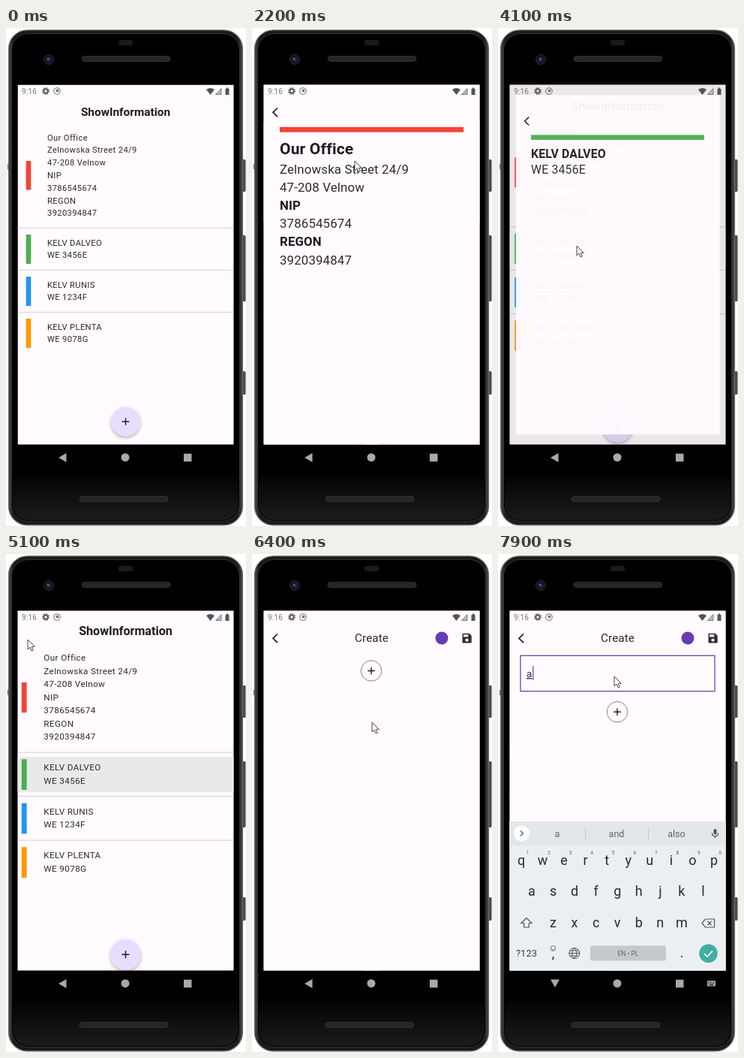
An HTML page for the animation above (8000 ms loop, 320 px wide and 663 px high).

```html
<!DOCTYPE html>
<html lang="en">
<head>
<meta charset="utf-8">
<title>Phone demo</title>
<style>
html, body { margin: 0; width: 100%; height: 100%; overflow: hidden; background: #fff; }
svg { display: block; width: 320px; height: 663px; font-family: Roboto, sans-serif; }
text { fill: #2b2a2e; white-space: pre; }
.mid { text-anchor: middle; }
.list { font-size: 11.2px; letter-spacing: .35px; }
.body { font-size: 16.8px; letter-spacing: .17px; }
.head { font-size: 21px; letter-spacing: .17px; }
.bar { font-size: 15.4px; }
.bold { font-weight: 700; fill: #1d1b20; }
.key { font-size: 18px; }
.hint { font-size: 12.5px; fill: #5f6368; }
.tiny { font-size: 6.5px; fill: #5f6368; }
.line { fill: none; stroke: #1d1b20; stroke-width: 1.4; }
.soft { fill: none; stroke: #50555a; stroke-width: 1.2; }
</style>
</head>
<body>
<svg id="stage" viewBox="0 0 320 663"></svg>
<script>
const PAPER = '#fffbff';
const text = (x, y, s, cls = '') => `<text x="${x}" y="${y}" class="${cls}">${s}</text>`;
const rect = (x, y, w, h, fill, more = '') =>
  `<rect x="${x}" y="${y}" width="${w}" height="${h}" fill="${fill}" ${more}/>`;
const circle = (x, y, r, fill, more = '') => `<circle cx="${x}" cy="${y}" r="${r}" fill="${fill}" ${more}/>`;
const path = (d, more) => `<path d="${d}" ${more}/>`;
const group = (id, body, more = '') => `<g id="${id}" ${more}>${body}</g>`;
const plus = (x, y, r) => path(`M${x - r} ${y}h${2 * r}M${x} ${y - r}v${2 * r}`, 'class="line"');
const sheet = rect(15.5, 75.5, 288.5, 479.5, PAPER);
const back = path('M34 106.5l-6 5.8 6 5.8', 'class="line" style="stroke-width:1.7"');
const banner = color => rect(37, 131.8, 245, 6.9, color);

const company = ['Our Office', 'Zelnowska Street 24/9', '47-208 Velnow', 'NIP', '3786545674', 'REGON', '3920394847'];
const cars = [
  ['KELV DALVEO', 'WE 3456E', '#4caf50'],
  ['KELV RUNIS', 'WE 1234F', '#2196f3'],
  ['KELV PLENTA', 'WE 9078G', '#ff9800'],
];

function phone() {
  return `<defs>
    <linearGradient id="side"><stop offset="0" stop-color="#4a4a4a"/><stop offset=".02" stop-color="#1a1a1a"/>
      <stop offset=".98" stop-color="#1a1a1a"/><stop offset="1" stop-color="#4a4a4a"/></linearGradient>
    <linearGradient id="chin" x2="0" y2="1"><stop offset="0" stop-color="#000"/><stop offset="1" stop-color="#1c1c1c"/></linearGradient>
    <clipPath id="screen">${rect(15.5, 75.5, 288, 479, '#000')}</clipPath>
    <filter id="shade" x="-40%" y="-40%" width="180%" height="180%">
      <feDropShadow dx="0" dy="2" stdDeviation="2" flood-opacity=".32"/></filter></defs>`
    + [[175, 43], [276, 88], [457, 31]].map(([y, h]) => rect(314, y, 5.5, h, '#4a4a4a', 'rx="1.5"')).join('')
    + rect(2, 181, 4, 7, '#666')
    + rect(3.5, 2.8, 312, 659, 'url(#side)', 'rx="25" stroke="#6a6a6a" stroke-width="1.2"')
    + rect(7.5, 7.5, 304, 649, '#000', 'rx="22" stroke="#3c3c3c" stroke-width=".8"')
    + rect(9, 588, 301, 67, 'url(#chin)', 'rx="21"')
    + rect(101, 37.5, 118, 7, '#262626', 'rx="3.5" stroke="#3a3a3a" stroke-width=".7"')
    + rect(98, 623.5, 118, 7, '#262626', 'rx="3.5" stroke="#3a3a3a" stroke-width=".7"')
    + rect(150, 16, 19, 7, '#1b1b1b', 'rx="2"')
    + circle(57, 42, 6.5, '#15151c', 'stroke="#292931"') + circle(57, 42, 2.7, '#252b62')
    + circle(56, 41, 1, '#7880b6');
}

function statusBar() {
  return '<text x="21" y="88" font-size="10" style="fill:#77757a" letter-spacing=".2">9:16</text>'
    + circle(53, 84, 2.7, 'none', 'stroke="#5d5b60" stroke-width="2"')
    + circle(53, 84, 4.3, 'none', 'stroke="#5d5b60" stroke-width="1.4" stroke-dasharray="1.7 1.68"')
    + circle(68, 84, 4.3, 'none', 'stroke="#77757a" stroke-width="1.1"') + circle(68.5, 83.5, 2, '#77757a')
    + path('M267 82q5.500-4 11 0l-5.500 7z', 'fill="#55535a"')
    + path('M279.500 88.500h7.500v-8z', 'fill="#bbb8bd" stroke="#66646a" stroke-width=".8"')
    + path('M292.500 81h1.300v-1.500h2.400v1.500h1.300v8h-5z', 'fill="#55535a"');
}

function listPage() {
  let s = sheet + text(159.5, 117, 'ShowInformation', 'bar bold mid');
  s += rect(0, 135.5, 320, 126, '#e9e9e9', 'id="tap0"') + rect(0, 272, 320, 45, '#e9e9e9', 'id="tap1"');
  s += rect(26.7, 177, 6.6, 38.5, '#f44336');
  company.forEach((line, i) => s += text(55, 149.5 + 16.8 * i, line, 'list'));
  cars.forEach(([name, plate, color], i) => {
    const y = 266.3 + 56 * i;
    s += rect(0, y - .4, 320, .8, '#cac4d0') + rect(26.7, y + 8.7, 6.6, 39, color)
      + text(55, y + 23.2, name, 'list') + text(55, y + 40, plate, 'list');
  });
  return s + circle(159.5, 524, 19.6, '#e8ddfd', 'filter="url(#shade)"') + plus(159.5, 524, 4.8);
}

function companyPage() {
  let s = sheet + back + banner('#f44336') + text(37, 168, company[0], 'head bold');
  company.slice(1).forEach((line, i) =>
    s += text(37, 194 + 24.1 * i, line, /^[A-Z]+$/.test(line) ? 'body bold' : 'body'));
  return s;
}

function carPage() {
  const [name, plate, color] = cars[0];
  return sheet + back + banner(color) + text(37, 164, name, 'body bold') + text(37, 187, plate, 'body');
}

function createPage() {
  return sheet + back + text(159.5, 117.3, 'Create', 'bar mid') + circle(253, 112, 8.5, '#673ab7')
    + path('M281.500 105.800h8.200l3 3v8.600q0 1-1 1h-10.200q-1 0-1-1v-10.600q0-1 1-1z', 'fill="#302e34"')
    + rect(282, 107.3, 6.3, 3, PAPER) + circle(286.5, 114.6, 2.1, PAPER)
    + group('field', rect(30, 135.3, 259, 47.4, 'none', 'id="frame" stroke-width="1.3"')
      + group('typed', '<text x="38" y="164" font-size="13.500" text-decoration="underline">a</text>')
      + rect(46.3, 149, 1.2, 19, '#673ab7', 'id="caret"'))
    + group('add', circle(159, 155.5, 13.7, 'none', 'stroke="#77747b" stroke-width=".9"') + plus(159, 155.5, 4.7));
}

function keyboard() {
  const step = 28.55;
  const row = (keys, x, y) => [...keys].map((k, i) => text(x + step * i, y, k, 'key mid')).join('');
  const digits = [...'1234567890'].map((k, i) => text(39.5 + step * i, 400, k, 'tiny mid')).join('');
  return rect(15, 356, 290, 200, '#eceff1') + rect(15, 356, 290, 32, '#e4e7e9')
    + circle(31.5, 372, 10.5, '#fff') + path('M30 368.500l3.500 3.500-3.500 3.500', 'class="soft"')
    + group('hints', text(79, 376.5, 'a', 'hint mid') + text(158, 376.5, 'and', 'hint mid')
      + text(238, 376.5, 'also', 'hint mid') + rect(116, 364, .8, 17, '#bfc3c6') + rect(200, 364, .8, 17, '#bfc3c6'))
    + rect(287.5, 366, 4, 7.5, '#50555a', 'rx="2"') + path('M285.500 371.500q0 4.300 4 4.300t4-4.300M289.500 376v2.500', 'class="soft"')
    + row('qwertyuiop', 31, 414) + digits + row('asdfghjkl', 45, 455) + row('zxcvbnm', 73.5, 497)
    + path('M38 484.500l-7 7h3.700v5.500h6.600v-5.500h3.700z', 'class="soft"')
    + path('M272 491.500l4.500-5.500h12v11h-12zM279.500 489l5 5m0-5l-5 5', 'class="soft"')
    + '<text x="38" y="536" class="mid" font-size="13" style="fill:#3c4043">?123</text>'
    + text(73.5, 538, ',', 'key mid') + circle(73.5, 525, 3.3, 'none', 'stroke="#50555a" stroke-width=".8"')
    + path('M71.800 526q1.700 2 3.400 0', 'class="soft" style="stroke-width:.7"')
    + path('M94.800 531.500a7 7 0 1 0 14 0a7 7 0 1 0-14 0zh14M101.800 524.500q-6.500 7 0 14q6.500-7 0-14M96 528h11.600M96 535h11.600'.replace('zh14', 'h14'),
      'class="soft" style="stroke-width:1"')
    + rect(123, 521.5, 101, 20, '#c5c9cb', 'rx="2"')
    + '<text x="173.500" y="534.500" class="mid" font-size="8.500" style="fill:#5f6368">EN • PL</text>'
    + text(245, 537, '.', 'key mid')
    + circle(280.5, 531.8, 12.3, '#43ada2') + path('M275 532l4 4 7-7.500', 'fill="none" stroke="#fff" stroke-width="1.6"');
}

function navBar() {
  const gray = 'fill="#a9a9a9"';
  let dots = '';
  for (let i = 0; i < 8; i++) dots += rect(280.3 + i % 4 * 2.2, 569.5 + (i >> 2) * 2, 1.1, 1.1, '#000');
  return path('M70 572l10.500-6v12z', `id="navBack" ${gray}`) + path('M70 566.500h12l-6 10.500z', `id="navDown" ${gray}`)
    + circle(159, 571.7, 5.5, '#a9a9a9') + rect(237, 566.7, 10.5, 10.5, '#a9a9a9')
    + group('navKeys', rect(279, 568, 11, 7.5, '#a9a9a9', 'rx="1"') + dots + rect(282, 573.4, 5, 1, '#000'));
}

stage.innerHTML = phone()
  + group('app', group('list', listPage()) + rect(15, 75, 290, 481, '#000', 'id="scrim"')
    + group('company', companyPage()) + group('car', carPage()) + group('create', createPage())
    + circle(35, 112, 14, '#000', 'id="ripple" opacity=".13"') + statusBar() + group('keys', keyboard()),
  'clip-path="url(#screen)"')
  + navBar()
  + group('mouse', path('M0 0v12.800l3-2.700 2.200 4.900 2.200-1-2.200-4.700h4.100z', 'fill="#fffbff" stroke="#333" stroke-width=".9"'));

const el = id => document.getElementById(id);
const set = (id, name, value) => el(id).setAttribute(name, value);
const show = (id, on) => set(id, 'visibility', on ? 'inherit' : 'hidden');
const part = (t, from, span) => Math.max(0, Math.min(1, (t - from) / span));
const ease = u => 1 - (1 - u) ** 2;
const zoom = s => `translate(160 315) scale(${s}) translate(-160 -315)`;

// page, opens at, closes at, tapped row
const visits = [['company', 1900, 3300, 'tap0'], ['car', 4000, 5000, 'tap1'], ['create', 5900, 9999]];
// time, x, y of the pointer
const route = [
  [1000, 320, 410], [1700, 137, 177], [2300, 137, 177], [2900, 29, 113], [3400, 29, 113],
  [3900, 105, 290], [4300, 105, 290], [4800, 29, 114], [5200, 29, 114], [5700, 157, 520],
  [6000, 157, 520], [6300, 161, 257], [6400, 160, 224], [6700, 157, 150], [6900, 157, 150],
  [7200, 155, 163], [8000, 155, 163],
];

function pointerAt(t) {
  const i = route.findIndex(p => p[0] > t);
  const [a, b] = [route[i - 1], route[i]];
  const u = (t - a[0]) / (b[0] - a[0]);
  return [a[1] + (b[1] - a[1]) * u, a[2] + (b[2] - a[2]) * u];
}

function draw(t) {
  let listScale = 1, dim = 0;
  for (const [page, open, close, tap] of visits) {
    const u = part(t, open, 300), v = part(t, close, 300);
    const alpha = Math.min(1, u * 2.86) * Math.max(0, 1 - v * 3);
    set(page, 'opacity', alpha);
    show(page, alpha > 0);
    set(page, 'transform', zoom(.87 + .13 * ease(u) - .1 * ease(v)));
    if (t >= open) {
      listScale = t < close ? 1 + .06 * ease(u) : 1 + .1 * (1 - ease(v));
      dim = t < close ? .14 * ease(u) : 0;
    }
    if (tap) set(tap, 'opacity', u * (1 - part(t, close + 200, 300)));
  }
  set('list', 'transform', zoom(listScale));
  set('scrim', 'opacity', dim);
  show('ripple', (t >= 3100 && t < 3400) || (t >= 4900 && t < 5000));

  const added = t >= 6800, typing = t >= 7300, typed = t >= 7700;
  show('field', added);
  set('add', 'transform', `translate(0 ${added ? 54.7 : 0})`);
  set('frame', 'stroke', typing ? '#6746ad' : '#79747e');
  show('typed', typed);
  show('caret', typing);
  set('caret', 'x', typed ? 46.3 : 38);
  show('keys', typing);
  set('keys', 'transform', `translate(0 ${199 * (1 - ease(part(t, 7200, 300)))})`);
  show('hints', typed);
  show('navBack', !typing);
  show('navDown', typing);
  show('navKeys', typing);

  show('mouse', t >= 1000);
  if (t >= 1000) set('mouse', 'transform', `translate(${pointerAt(t)})`);
}

const start = performance.now();
function tick() {
  const t = (performance.now() - start) % 8000;
  draw(Math.floor(t / 100) * 100);
  requestAnimationFrame(tick);
}
tick();
</script>
</body>
</html>
```
